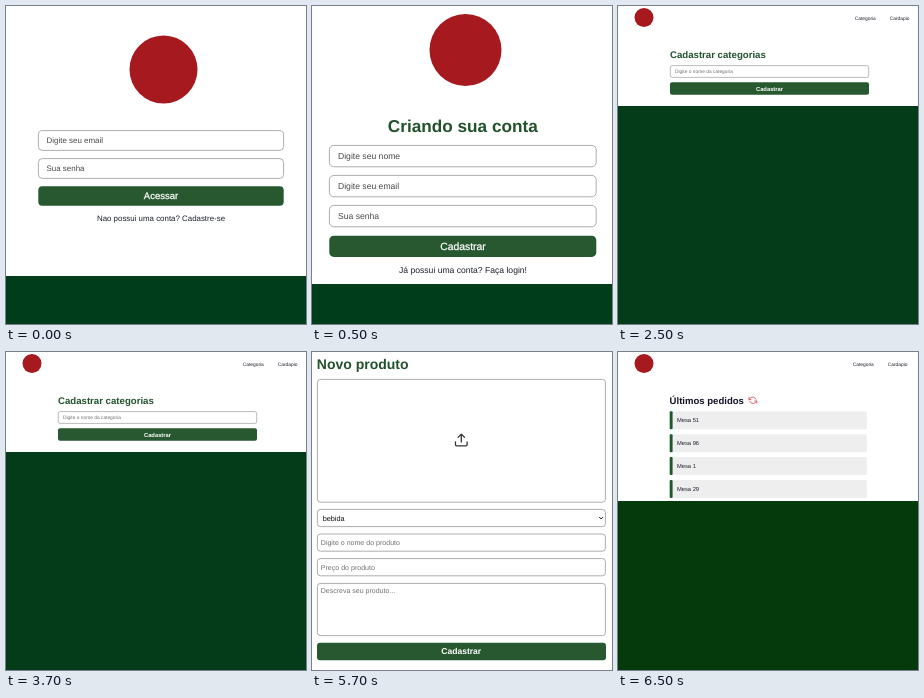
Write an HTML page that moves like this. It is 300x318 px and loops after 8 s.

```html
<!DOCTYPE html>
<html lang="pt-BR">
<head>
<meta charset="utf-8">
<style>
html, body { margin: 0; height: 100%; overflow: hidden; background: #fff; }
svg { display: block; width: 100%; height: 100%; font-family: "Liberation Sans", Arial, sans-serif; text-rendering: geometricPrecision; }
</style>
</head>
<body>
<svg id="stage" viewBox="0 0 300 318"></svg>
<script>
const GREEN = '#27582f', HINT = '#707070', INK = '#1c202c', FIELD = '#484848';

const rect = (x, y, w, h, fill, more = '') =>
  `<rect x="${x}" y="${y}" width="${w}" height="${h}" fill="${fill}" ${more}/>`;
const text = (s, x, y, size, fill = INK, more = '') =>
  `<text x="${x}" y="${y}" font-size="${size}" fill="${fill}" ${more}>${s}</text>`;
const mid = (s, x, y, size, fill, more = '') =>
  text(s, x, y, size, fill, 'text-anchor="middle" ' + more);
const title = (s, x, y, size, fill = '#21522c') => text(s, x, y, size, fill, 'font-weight="700"');
const logo = (x, y, r) => `<circle cx="${x}" cy="${y}" r="${r}" fill="#a5191f"/>`;
const box = (x, y, w, h, r, line = 0.7) =>
  rect(x, y, w, h, '#fff', `rx="${r}" stroke="#8c8c8c" stroke-width="${line}"`);
const button = (x, y, w, h, r) => rect(x, y, w, h, GREEN, `rx="${r}"`);
const floor = (y, fill) => rect(0, y, 300, 318 - y, fill);
const icon = (d, x, y, scale, color, width) =>
  `<path d="${d}" transform="translate(${x} ${y}) scale(${scale}) translate(-12 -12)" fill="none"
    stroke="${color}" stroke-width="${width}" stroke-linecap="round" stroke-linejoin="round"/>`;
const nav = x => logo(26, 11.5, 9.5) +
  text('Categoria', x, 14, 4.85) + text('Cardapio', x + 35, 14, 4.85);

const BOLD = 'font-weight="700"';
const MEDIUM = 'stroke="#fff" stroke-width="0.25"';
const UPLOAD = 'M21 15v4a2 2 0 0 1-2 2H5a2 2 0 0 1-2-2v-4M17 8l-5-5-5 5M12 3v12';
const REFRESH = 'M1 4v6h6M23 20v-6h-6M20.5 9A9 9 0 0 0 5.6 5.6L1 10M23 14l-4.6 4.4A9 9 0 0 1 3.5 15';

const login = () => floor(270, '#003d1b') + logo(157.5, 63.5, 34) +
  ['Digite seu email', 'Sua senha'].map((s, i) =>
    box(32.4, 124.6 + 28 * i, 245.2, 19.8, 4) + text(s, 40.5, 137.2 + 28 * i, 7.95, FIELD)).join('') +
  button(32.3, 180.3, 245.4, 19.5, 4) + mid('Acessar', 155, 193.2, 9.5, '#fff', MEDIUM) +
  mid('Nao possui uma conta? Cadastre-se', 155, 215, 7.9);

const signup = () => floor(278, '#003d1b') + logo(153.5, 44, 36) +
  title('Criando sua conta', 75.8, 126, 17.2) +
  ['Digite seu nome', 'Digite seu email', 'Sua senha'].map((s, i) =>
    box(17.4, 139.4 + 30 * i, 266.8, 21.4, 4.5) + text(s, 26, 153 + 30 * i, 8.6, FIELD)).join('') +
  button(17.3, 229.7, 267, 21.2, 4.5) + mid('Cadastrar', 151, 243.5, 10.4, '#fff', MEDIUM) +
  mid('Já possui uma conta? Faça login!', 151, 267.4, 8.6);

const category = () => floor(100, '#043c1a') + nav(236.8) +
  title('Cadastrar categorias', 52, 52.3, 9.65) +
  box(52.3, 59.6, 198.4, 11.8, 2, 0.6) + text('Digite o nome da categoria', 57, 67.2, 4.85, HINT) +
  button(52, 76.2, 199, 12.6, 2) + mid('Cadastrar', 151.5, 84.5, 5.8, '#fff', BOLD);

const product = () => title('Novo produto', 4.8, 17, 14) +
  box(5.4, 27.4, 288, 122.8, 3) + icon(UPLOAD, 149.3, 88, 0.65, '#333', 2) +
  box(5.4, 157.4, 288, 17.2, 3) + text('bebida', 10.7, 168.7, 7.3, '#111') +
  '<path d="M287.2 165l1.9 2 1.9-2" fill="none" stroke="#222" stroke-width="1"/>' +
  box(5.4, 182, 288, 17.2, 3) + text('Digite o nome do produto', 8.8, 193.2, 7.05, HINT) +
  box(5.4, 206.6, 288, 17.2, 3) + text('Preço do produto', 8.8, 217.8, 7.05, HINT) +
  box(5.4, 231.4, 288, 52.2, 3) + text('Descreva seu produto...', 8.8, 241.3, 7, HINT) +
  button(5, 290.7, 289, 17.6, 3) + mid('Cadastrar', 149.2, 302.4, 8.55, '#fff', BOLD);

const orders = () => floor(149, '#053b0c') + nav(234.8) +
  title('Últimos pedidos', 51.6, 52.2, 9.55, '#101026') +
  icon(REFRESH, 134.9, 48.3, 0.36, '#d9505a', 2.4) +
  [51, 96, 1, 29].map((n, i) => {
    const y = 59.3 + 22.9 * i;
    return rect(51.7, y, 197.1, 18, '#eee', 'rx="1.5"') + rect(51.7, y, 2.9, 18, '#1c5a2b', 'rx="1"') +
      text('Mesa ' + n, 59, y + 11, 5.75);
  }).join('');

const scenes = [[0, login], [500, signup], [2500, category], [4500, product], [6500, orders]];
const stage = document.getElementById('stage');
const start = performance.now();
let shown;

function frame() {
  const t = (performance.now() - start) % 8000;
  const scene = scenes.filter(([from]) => from <= t).pop()[1];
  if (scene !== shown) stage.innerHTML = (shown = scene)();
  requestAnimationFrame(frame);
}
frame();
</script>
</body>
</html>
```
